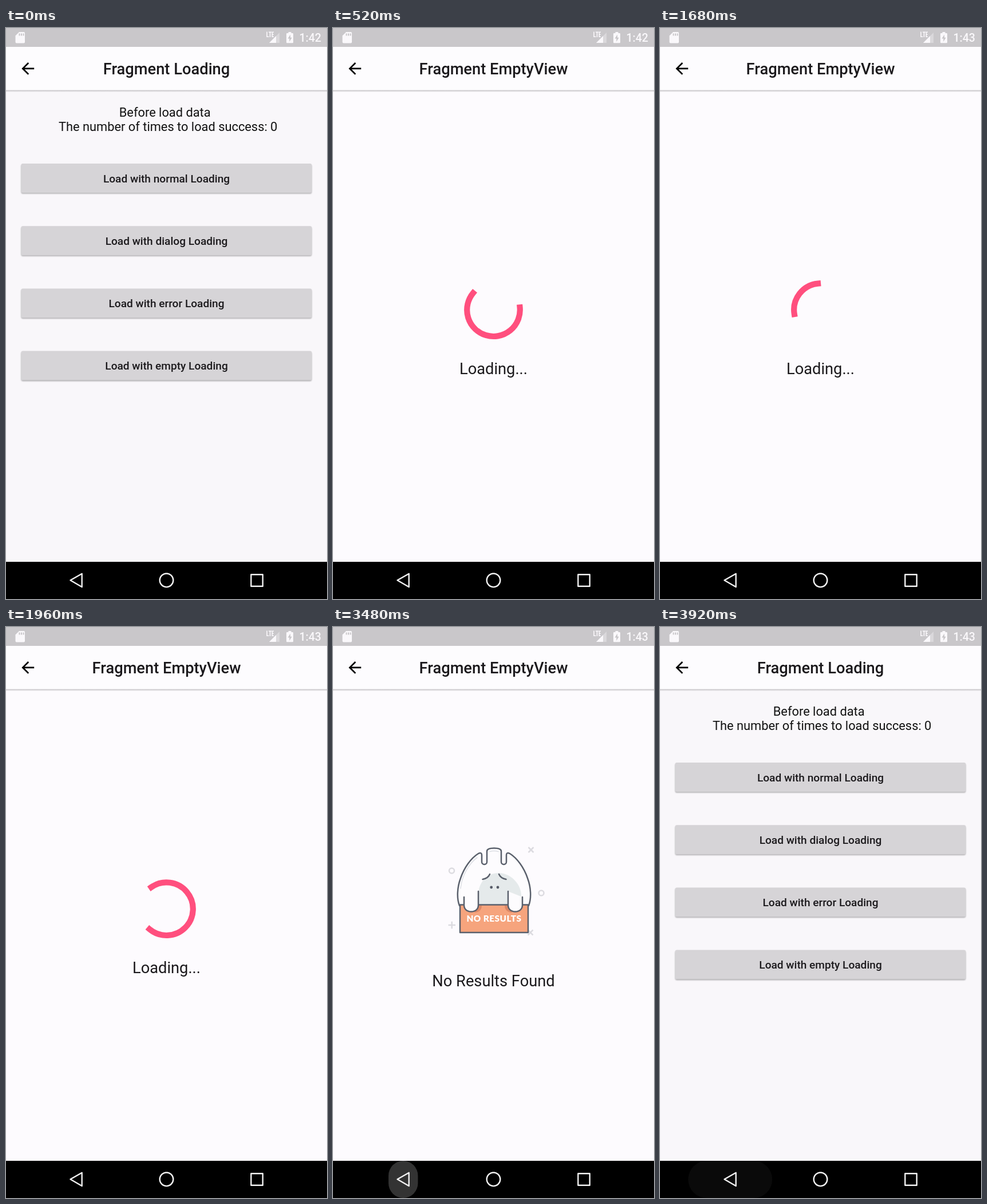
An HTML page for the animation above (4.12 s loop, 561 px wide and 998 px high).

```html
<!DOCTYPE html>
<html lang="en">
<head>
<meta charset="utf-8">
<title>Loading states</title>
<style>
  html, body { margin: 0; width: 100%; height: 100%; overflow: hidden; background: #fdfbfe; }
  svg { display: block; width: 100vw; height: 100vh; font-family: Roboto, sans-serif; }
  text { text-anchor: middle; fill: #1b191c; }
  .title { font-size: 27.27px; font-weight: 500; }
  .note { font-size: 27.27px; }
  .info { font-size: 21.82px; fill: #111; }
  .label { font-size: 19.09px; font-weight: 500; }
  .ink { stroke: #5a606c; stroke-width: 2.5; stroke-linecap: round; stroke-linejoin: round; }
</style>
</head>
<body>
<svg viewBox="0 0 561 998">
  <defs>
    <linearGradient id="drop" x2="0" y2="1">
      <stop offset="0" stop-color="#bdbbbe"/>
      <stop offset="1" stop-color="#bdbbbe" stop-opacity="0"/>
    </linearGradient>
    <filter id="soft" x="-5%" y="-30%" width="110%" height="160%"><feGaussianBlur stdDeviation="1.3"/></filter>
    <clipPath id="lastButton"><rect x="26.6" y="564.6" width="507.6" height="51" rx="2.7"/></clipPath>
  </defs>

  <rect id="page" width="561" height="998"/>

  <g id="list">
    <text class="info" x="277.7" y="154.5">Before load data</text>
    <text class="info" x="283.2" y="180">The number of times to load success: 0</text>
    <g id="buttons"></g>
    <circle id="ripple" cx="280.5" cy="590" clip-path="url(#lastButton)" fill="#000" opacity=".1"/>
    <text class="label" x="280.5" y="597.4">Load with empty Loading</text>
  </g>

  <g id="loading">
    <path id="arc" fill="none" stroke="#ff4f7e" stroke-width="10.2" stroke-linecap="square"/>
    <text class="note" x="280.5" y="605">Loading...</text>
  </g>

  <g id="empty">
    <g fill="none" stroke="#dcdbe0" stroke-width="2.5">
      <path d="M341.500 385l9 9m0-9l-9 9M340.500 529.500l9 9m0-9l-9 9M201.500 521h12.500m-6.250-6.250v12.500"/>
      <circle cx="207.500" cy="426" r="4.500"/>
      <circle cx="364" cy="465" r="4.500"/>
    </g>
    <path class="ink" fill="#fdfcfe" d="M221 487C216 474 217 455 223 439C229 421 241 404 254 396C258 394 260 395 260 399V410.500a4.500 4.500 0 0 0 9 0V392C269 388 273 386.500 281.500 386.500S294 388 294 392V410.500a4.500 4.500 0 0 0 9 0V399C303 395 305 394 309 396C322 404 334 421 340 439C346 455 347 474 342 487Z"/>
    <path fill="none" stroke="#dfe1e6" stroke-width="1.600" stroke-linecap="round" d="M223 457C225 436 236 415 252 403M274 392.500C278 391 285 391 289 392.500"/>
    <path fill="#e5eaeb" d="M254 485V463C257 443 271 430 290 430S327 447 329 467V485Z"/>
    <rect class="ink" x="222" y="485.500" width="119" height="48.500" fill="#f6a47d" stroke-linejoin="miter"/>
    <path fill="#dc8866" d="M254 487H260C260 495 254 499 247 499ZM306 487H300C300 495 306 499 313 499Z"/>
    <path class="ink" fill="#fdfcfe" d="M229 472V486C229 493 234 497.500 241.500 497.500S254 493 254 486V462M306 462V486C306 493 311 497.500 318.500 497.500S331 493 331 486V472"/>
    <path class="ink" fill="none" d="M261.500 441C267 440 272 437 274 432M302.500 441C297 440 292 437 290 432"/>
    <g fill="#565b67"><circle cx="276.700" cy="455" r="2.400"/><circle cx="288" cy="455" r="2.400"/></g>
    <text x="281.500" y="515" style="font:900 15.300px Lato,sans-serif;letter-spacing:.5px;fill:#fff">NO RESULTS</text>
    <text class="note" x="280.500" y="627.500">No Results Found</text>
  </g>

  <rect y="33" width="561" height="76" fill="#fdfcfe"/>
  <rect y="108.700" width="561" height="3.300" fill="url(#drop)"/>
  <path transform="translate(21.900 54.600) scale(1.3635)" d="M20 11H7.830l5.590-5.590L12 4l-8 8 8 8 1.410-1.410L7.830 13H20z"/>
  <text id="title" class="title" x="280.500" y="81.400"></text>

  <rect width="561" height="33" fill="#c9c7ca"/>
  <g fill="#faf8fb">
    <path d="M23 7H31a2 2 0 0 1 2 2V24.500a2 2 0 0 1-2 2H18.500a2 2 0 0 1-2-2V13.500Z"/>
    <path fill="#c9c7ca" d="M22.500 9.500h2v4h-2zm3.500 0h2v4h-2zm3.500 0h2v4h-2z"/>
    <path d="M478 8V26H460Z" opacity=".35"/>
    <path d="M472 14V26H460Z"/>
    <path fill="none" stroke="#faf8fb" stroke-width="1.600" d="M456 6.500V15.200H459.500M459 7.300H464M461.500 7.300V16M468 7.300H465.300V15.200H468M465.300 11.200H467.700"/>
    <path d="M493.500 9V7h5v2h2.200a1.300 1.300 0 0 1 1.300 1.300V25a1.300 1.300 0 0 1-1.300 1.300h-9.400A1.300 1.300 0 0 1 490 25V10.300A1.300 1.300 0 0 1 491.300 9Z"/>
    <path fill="#c9c7ca" d="M497 11.500L492.500 18.500H495.300V24L499.700 16.700H497Z"/>
    <text id="clock" x="551" y="24" style="font-size:19.600px;font-weight:500;text-anchor:end;fill:#faf8fb"></text>
  </g>

  <rect y="933" width="561" height="65"/>
  <rect id="glow" y="933" height="65" fill="#fff"/>
  <g fill="none" stroke="#f2f2f2" stroke-width="2.400" stroke-linejoin="round">
    <path d="M112.500 965.300L132.700 953.700V977Z"/>
    <circle cx="280.500" cy="965.300" r="11.800"/>
    <rect x="428.300" y="955.300" width="20.400" height="20.400"/>
  </g>
</svg>
<script>
const LOOP = 4120, STEP = 40;
const PRESS = 40, OPEN = 160, SPIN_START = 152, MINUTE = 1400, RESULT = 2160;
const BACK = 3480, RELEASE = 3560, CLOSE = 3600;
const CYCLE = 1333, SWEEP = 270;

const $ = id => document.getElementById(id);
const clamp = x => Math.max(0, Math.min(1, x));
const show = (id, on) => $(id).setAttribute("display", on ? "inline" : "none");
const set = (id, attrs) => {
  for (const k in attrs) $(id).setAttribute(k, attrs[k]);
};

$("buttons").innerHTML = ["normal", "dialog", "error", ""].map((kind, i) => {
  const y = 237 + i * 109.2;
  const box = `x="26.6" width="507.6" height="51" rx="2.7"`;
  const label = kind && `<text class="label" x="280.5" y="${y + 33}">Load with ${kind} Loading</text>`;
  return `<rect id="shade${i}" ${box} y="${y + 1.6}" fill="#000" opacity=".3" filter="url(#soft)"/>
    <rect ${box} y="${y}" fill="#d6d4d7"/>${label}`;
}).join("");

// Cubic ease with control points (.4, 0) and (.2, 1)
function ease(x) {
  let lo = 0, hi = 1;
  for (let i = 0; i < 24; i++) {
    const u = (lo + hi) / 2, v = 1 - u;
    if (1.2 * v * v * u + 0.6 * v * u * u + u * u * u < x) lo = u; else hi = u;
  }
  return lo * lo * (3 - 2 * lo);
}

function point(deg) {
  const a = deg * Math.PI / 180;
  return `${280.5 + 46.3 * Math.sin(a)} ${492.7 - 46.3 * Math.cos(a)}`;
}

function spin(ms) {
  const p = ms % CYCLE / CYCLE;
  const base = ms * 720 / 4444 + p * 90;
  const head = base + SWEEP * ease(clamp(p * 2));
  const tail = base + SWEEP * ease(clamp(p * 2 - 1));
  const end = Math.max(head, tail + 0.2);
  set("arc", { d: `M${point(tail)}A46.3 46.3 0 ${end - tail > 180 ? 1 : 0} 1 ${point(end)}` });
}

function draw(t) {
  const isList = t < OPEN || t >= CLOSE;
  const isLoading = t >= OPEN && t < RESULT;
  show("list", isList);
  show("loading", isLoading);
  show("empty", !isList && !isLoading);
  set("page", { fill: isList ? "#f9f7fa" : "#fdfbfe" });
  $("title").textContent = isList ? "Fragment Loading" : "Fragment EmptyView";
  $("clock").textContent = t < MINUTE ? "1:42" : "1:43";
  if (isLoading) spin(t - SPIN_START);

  const press = t < OPEN ? clamp((t - PRESS + STEP) / 160) : 0;
  const held = t >= PRESS ? press : 0;
  set("ripple", { r: 260 * held });
  set("shade3", { y: 566.2 + 3 * held });

  const grow = ease(clamp((t - BACK + 60) / 350));
  const scale = t === BACK ? 0.35 : Math.max(0.35, grow);
  const w = 147 * scale;
  const fade = 0.2 - 0.16 * clamp((t - RELEASE) / 360);
  set("glow", { x: 122.7 - w / 2, width: w, rx: Math.min(w, 65) / 2, opacity: t >= BACK ? fade : 0 });
}

const began = performance.now();
function tick() {
  const t = (performance.now() - began) % LOOP;
  draw(Math.floor(t / STEP) * STEP);
  requestAnimationFrame(tick);
}
tick();
</script>
</body>
</html>
```
